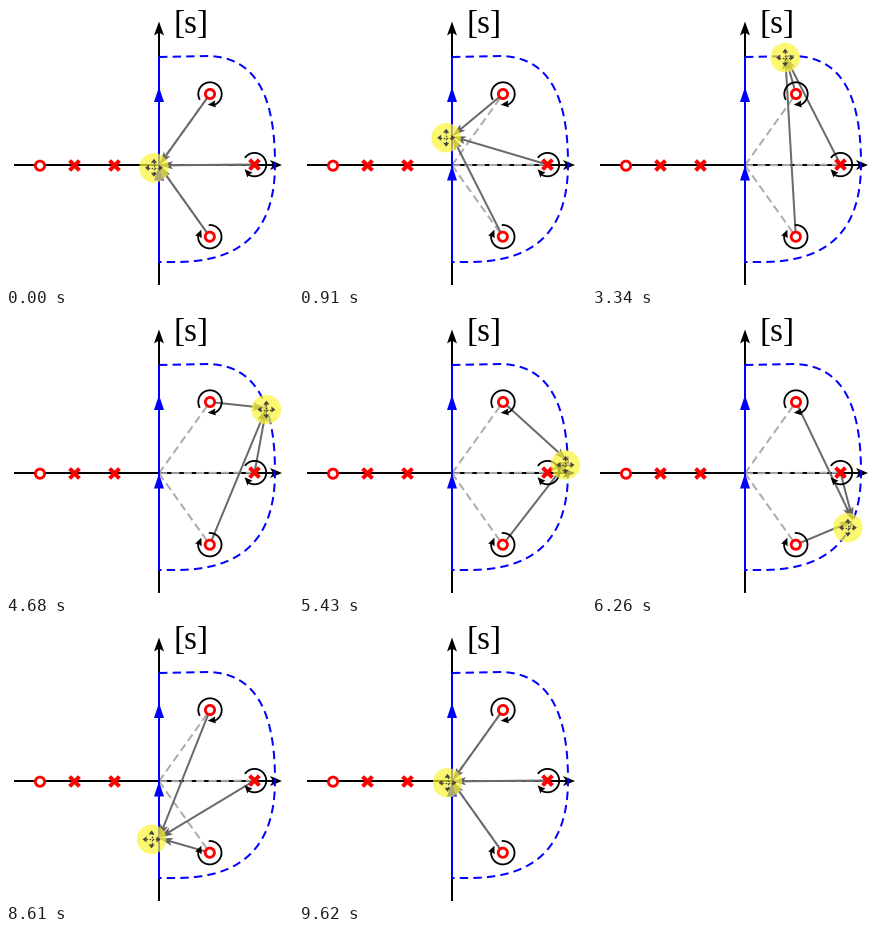
A matplotlib script for the animation above (9.7 s loop, 287x280 px).

```python
import numpy as np
import matplotlib.pyplot as plt
from matplotlib.animation import FuncAnimation
from matplotlib.patches import Circle, Polygon

W, H, DPI = 287, 280, 128
STEP, LOOP = 50, 9700
BLUE, RED, GREY = "#0000ff", "#ff0000", "#6a6a6a"
ORIGIN = np.array([153.0, 159.3])
ZEROS = [(204.0, 88.0), (203.8, 230.7)]
POLE = (248.5, 158.6)
ROOTS = [ZEROS[0], POLE, ZEROS[1]]

fig = plt.figure(figsize=(W / DPI, H / DPI), dpi=DPI, facecolor="white")
ax = fig.add_axes([0, 0, 1, 1])
ax.set_xlim(0, W)
ax.set_ylim(H, 0)
ax.axis("off")


def px(n):
    return n * 72 / DPI


def line(xs, ys, color, width, z, **kw):
    kw.setdefault("solid_capstyle", "butt")
    return ax.plot(xs, ys, color=color, lw=px(width), zorder=z, **kw)[0]


def head_points(tip, direction, length, width, notch):
    d = np.asarray(direction, float)
    d = d / max(np.hypot(*d), 1e-9)
    n = np.array([-d[1], d[0]])
    tip = np.asarray(tip, float)
    back = tip - d * length
    return np.array([tip, back + n * width / 2, back + d * notch,
                     back - n * width / 2])


def head(tip, direction, color, length, width, notch, z):
    shape = Polygon(head_points(tip, direction, length, width, notch),
                    closed=True, fc=color, ec="none", zorder=z)
    return ax.add_patch(shape)


def bezier(a, b, c, d, n=150):
    t = np.linspace(0, 1, n)[:, None]
    a, b, c, d = map(np.array, (a, b, c, d))
    return ((1 - t) ** 3 * a + 3 * t * (1 - t) ** 2 * b
            + 3 * t * t * (1 - t) * c + t ** 3 * d)


# Right half-plane contour
upper = bezier((200, 50), (250, 50), (269, 90), (269, 158))
lower = bezier((269, 158), (269, 222), (239, 256), (170, 256))
bow = np.vstack([(153, 51), upper, lower[1:], (153, 256)])
contour = np.vstack([ORIGIN, bow, ORIGIN])
arc_len = np.r_[0, np.cumsum(np.hypot(*np.diff(contour, axis=0).T))]


def length_near(x, y):
    """Arc length of the contour point closest to (x, y)."""
    s = np.linspace(0, arc_len[-1], 3000)
    gap = [np.interp(s, arc_len, contour[:, k]) - v
           for k, v in enumerate((x, y))]
    return s[np.argmin(np.hypot(*gap))]


# Coordinate axes
line([8, 267], [159, 159], "black", 2, 2)
head((276, 159), (1, 0), "black", 12, 10, 3, 2)
line([153, 153], [279, 25], "black", 2, 2)
head((153, 15.5), (0, -1), "black", 14, 10, 3, 2)
ax.text(167, 26.5, "[s]", family="Liberation Serif", fontsize=px(33),
        color="black", va="baseline", ha="left", zorder=3)

# Contour drawing
line(bow[:, 0], bow[:, 1], BLUE, 2, 3, ls=(0, (4.2, 2.6)),
     dash_capstyle="butt")
line([153, 153], [51, 257], BLUE, 2, 3)
for y in (81, 159.5):
    head((153, y), (0, -1), BLUE, 15, 10, 0, 4)

# Reference directions from the origin
for x, y in ROOTS:
    line([ORIGIN[0], x], [ORIGIN[1], y], "#acacac", 2, 2.5,
         ls=(0, (4, 2.2)), dash_capstyle="butt")

# Poles, zeros and their turning arrows
for x, y in [(34.0, 159.7)] + ZEROS:
    ax.add_patch(Circle((x, y), 4.6, fc="white", ec=RED, lw=px(2.8), zorder=7))
for x, y in [(68.5, 159.5), (108.5, 159.5), POLE]:
    for s in (1, -1):
        line([x - 4.9, x + 4.9], [y - 4.9 * s, y + 4.9 * s], RED, 4, 7)

for (x, y), start, end in zip(ROOTS, (150, 215, 265), (462, 515, 580)):
    a = np.radians(np.linspace(start, end - 25, 80))
    line(x + 11.7 * np.cos(a), y + 11.7 * np.sin(a), "black", 1.8, 6)
    e = np.radians(end)
    tip = (x + 11 * np.cos(e), y + 11 * np.sin(e))
    m = np.radians(end - 18)
    head(tip, (-np.sin(m), np.cos(m)), "black", 8, 7, 1, 6)

# Moving vectors
vectors = [(np.array(r), line([], [], GREY, 2, 5),
            head((0, 0), (1, 0), "#626262", 14, 8, 3, 5)) for r in ROOTS]

# Highlighted move pointer
halo = ax.add_patch(Circle((0, 0), 14.7, fc="#fbf434", ec="none",
                           alpha=0.7, zorder=8))
bars = [line([], [], "#45453a", 1.3, 9, ls=(0, (1.2, 1.2)))
        for _ in range(2)]
DIRS = [np.array(d) for d in ((1, 0), (-1, 0), (0, 1), (0, -1))]
points = [head((0, 0), d, "#45453a", 4, 6, 0, 9) for d in DIRS]

TIMES = [0, 300, 1830, 3340, 4680, 6260, 7610, 9450, LOOP]
TRAVEL = [0, 0, 71, length_near(194, 51), length_near(259, 95),
          length_near(262, 206), length_near(183, 255),
          arc_len[-1], arc_len[-1]]
OFF_X = [-5, -5, -7, 0, 0, -5, -11, -4.5, -4.5]
OFF_Y = [2.5, 2.5, 0, 1.5, 1.5, 7, 1, 1.5, 1.5]


def update(i):
    t = (i + 0.5) * STEP
    s = np.interp(t, TIMES, TRAVEL)
    tip = np.array([np.interp(s, arc_len, contour[:, k]) for k in (0, 1)])
    for root, shaft, arrow in vectors:
        d = tip - root
        d = d / np.hypot(*d)
        end = tip - d * 8
        shaft.set_data([root[0], end[0]], [root[1], end[1]])
        arrow.set_xy(head_points(tip, d, 14, 8, 3))

    c = tip + [np.interp(t, TIMES, OFF_X), np.interp(t, TIMES, OFF_Y)]
    halo.center = tuple(c)
    bars[0].set_data([c[0] - 6, c[0] + 6], [c[1], c[1]])
    bars[1].set_data([c[0], c[0]], [c[1] - 6, c[1] + 6])
    for d, p in zip(DIRS, points):
        p.set_xy(head_points(c + d * 9, d, 4, 6, 0))
    return []


anim = FuncAnimation(fig, update, frames=LOOP // STEP, interval=STEP,
                     init_func=lambda: update(0), repeat=True,
                     repeat_delay=0, blit=False)
plt.show()
```
